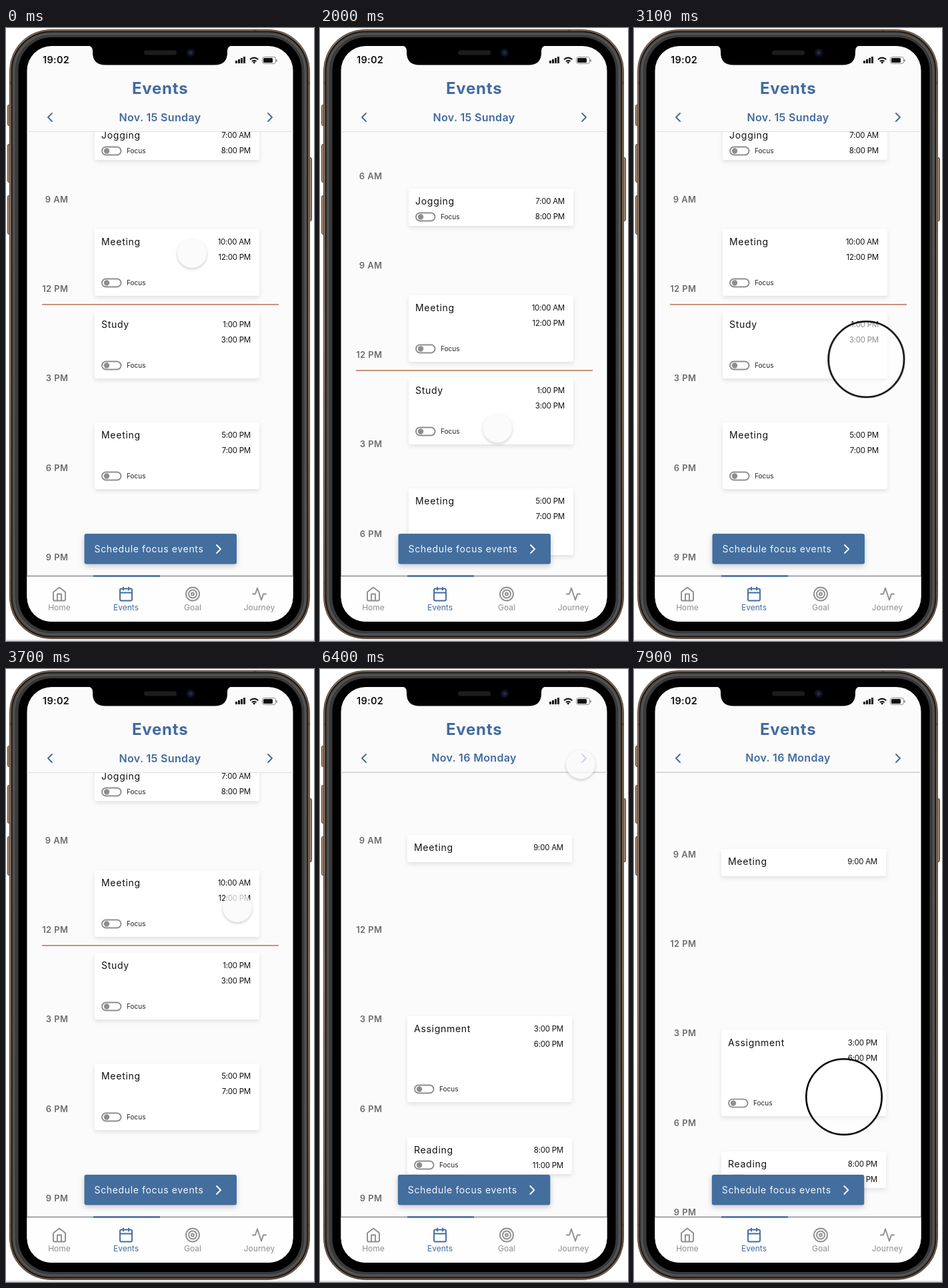
Recreate the animation shown at these times as an HTML page. Size 462 by 920 pixels, loop 8000 ms.

```html
<!DOCTYPE html>
<html lang="en">
<head>
<meta charset="utf-8">
<title>Events calendar</title>
<style>
html, body { margin: 0; width: 100%; height: 100%; overflow: hidden; background: #fff; }
svg { display: block; width: 462px; height: 920px; }
text { font-family: Inter, Roboto, sans-serif; white-space: pre; }
.mid { text-anchor: middle; }
.end { text-anchor: end; }
.line { fill: none; stroke: currentColor; stroke-width: 1.9; stroke-linecap: round; stroke-linejoin: round; }
.blue { color: #426b9f; }
.grey { color: #8e8e8e; }
.tint { fill: currentColor; }
.clock { font-size: 14.5px; font-weight: 600; fill: #111; letter-spacing: .3px; }
.title { font-size: 24px; font-weight: 700; letter-spacing: .8px; }
.date { font-size: 16px; font-weight: 600; letter-spacing: .35px; }
.hour { font-size: 13px; font-weight: 600; letter-spacing: .4px; fill: #6c6c6c; }
.name { font-size: 14px; letter-spacing: .72px; fill: #111; }
.time { font-size: 11.5px; letter-spacing: -.25px; fill: #111; }
.focus { font-size: 10px; fill: #222; }
.tab { font-size: 12px; }
.cta { font-size: 14px; letter-spacing: .65px; fill: #f4f8fc; }
.card { fill: #fff; filter: drop-shadow(0 3px 3px rgba(0,0,0,.1)); }
.button { fill: #436e9e; filter: drop-shadow(0 3px 4px rgba(0,0,0,.2)); }

.scroll, .touch, .dot, .ring, .sun, .mon { animation: 8s linear infinite; }
.scroll { animation-name: scroll; }
.touch { animation-name: touch; }
.dot { animation-name: dot; filter: drop-shadow(0 2px 2px rgba(0,0,0,.25)); }
.ring { animation-name: ring; }
.sun, .mon { animation-timing-function: step-end; }
.sun { animation-name: sun; }
.mon { animation-name: mon; }

@keyframes scroll {
  0%, 6% { transform: translateY(0); }
  10.9%, 31% { transform: translateY(99px); }
  35% { transform: translateY(32px); }
  35.8%, 96.5% { transform: translateY(0); }
  98.75% { transform: translateY(21px); }
  100% { transform: translateY(33px); }
}
@keyframes touch {
  0%, 6% { transform: translate(279px, 338px); }
  19%, 25% { transform: translate(266px, 600px); }
  30%, 31% { transform: translate(350px, 726px); }
  35% { transform: translate(350px, 659px); }
  42%, 47% { transform: translate(347px, 358px); }
  57%, 82% { transform: translate(391px, 143px); }
  94%, 96.5% { transform: translate(315px, 621px); }
  98.75% { transform: translate(315px, 642px); }
  100% { transform: translate(315px, 654px); }
}
@keyframes dot {
  0%, 5%, 20%, 30%, 43%, 67%, 71%, 95.5% { opacity: .76; }
  6%, 19%, 31%, 42%, 68%, 70%, 96.5%, 100% { opacity: 0; }
}
@keyframes ring {
  0%, 5%, 20%, 30%, 43%, 67%, 71%, 95.5% { opacity: 0; transform: scale(.4); }
  6%, 19%, 31%, 42%, 68%, 70%, 96.5%, 100% { opacity: 1; transform: scale(1); }
}
@keyframes sun { 0% { visibility: visible; } 70%, 100% { visibility: hidden; } }
@keyframes mon { 0% { visibility: hidden; } 70%, 100% { visibility: visible; } }
</style>
</head>
<body>
<svg viewBox="0 0 462 920">
  <defs>
    <clipPath id="list"><rect x="31" y="155.5" width="400" height="667"/></clipPath>
    <clipPath id="screen"><rect x="31.5" y="27" width="399" height="864" rx="37"/></clipPath>
    <linearGradient id="gold" x2="0" y2="1">
      <stop stop-color="#8a705c"/><stop offset=".5" stop-color="#a98d78"/><stop offset="1" stop-color="#75604f"/>
    </linearGradient>
  </defs>

  <path d="M0 919H462" stroke="#bdbdbd"/>
  <g fill="#a08875" stroke="#493a30">
    <rect x="2.5" y="115.5" width="6" height="31" rx="2"/>
    <rect x="2.5" y="174.5" width="6" height="57" rx="2"/>
    <rect x="2.5" y="251.5" width="6" height="58" rx="2"/>
    <rect x="452.5" y="194.5" width="6" height="95" rx="2"/>
  </g>
  <rect x="5.5" y="2.5" width="450" height="914" rx="62" fill="url(#gold)" stroke="#4a3c33"/>
  <path d="M374 3v4M90 912v4M6 83h4M6 834h4M451 83h4M451 834h4" stroke="#6f5d50" stroke-width="4"/>
  <rect x="8.5" y="5.5" width="444" height="908" rx="59" fill="#4b4b4b" stroke="#1a1816" stroke-width="2"/>
  <rect x="12.5" y="9.5" width="436" height="900" rx="55" fill="#3a3a3a" stroke="#585858" stroke-width="1.5"/>
  <rect x="18.5" y="14" width="425" height="891" rx="50"/>
  <g clip-path="url(#screen)">
    <path d="M31 26h400v865h-400z" fill="#fbfbfb"/>
    <g clip-path="url(#list)"><g id="days" class="scroll"></g></g>
    <path d="M31 155.5H431" stroke="#dedede"/>
    <path class="mon" d="M31 155H431" stroke="#c6c6c6"/>

    <text class="clock" x="55" y="53">19:02</text>
    <path d="M345.5 53v-4M349.5 53v-6M353.5 53v-8M357.5 53v-10" stroke="#111" stroke-width="3"/>
    <path d="M366 47.2q6.2-5.2 12.4 0M368.8 50.1q3.4-2.8 6.8 0" fill="none" stroke="#111" stroke-width="2"/>
    <path d="M370 51.3q2.2-1.7 4.4 0l-2.2 2.4z" fill="#111"/>
    <rect x="384.5" y="43.5" width="20" height="10" rx="3" fill="none" stroke="#888"/>
    <rect x="386" y="45" width="14" height="7" rx="1.5" fill="#111"/>
    <path d="M406 47v3.5" stroke="#888" stroke-width="1.5"/>

    <g class="blue">
      <text class="title mid tint" x="231.2" y="99">Events</text>
      <text class="date mid tint sun" x="231" y="139.5">Nov. 15 Sunday</text>
      <text class="date mid tint mon" x="231" y="139">Nov. 16 Monday</text>
      <path class="line" d="M69 128l-6 6 6 6M393 128l6 6-6 6"/>
    </g>

    <g id="buttons"></g>

    <path d="M31 823h400v68h-400z" fill="#fefefe"/>
    <path d="M31 822.5H431" stroke="#8b8d92" stroke-width="1.5"/>
    <path d="M131 822.5H231" stroke="#426b9f" stroke-width="2.5"/>
    <g id="tabs"></g>
  </g>

  <path d="M122 26.5q8 0 8 8v2q0 19 19 19h164q19 0 19-19v-2q0-8 8-8z"/>
  <rect x="207" y="33.5" width="49" height="7" rx="3.5" fill="#1d1d1d"/>
  <circle cx="277" cy="37" r="6" fill="#10131f"/>
  <circle cx="277" cy="37" r="2.8" fill="#1d2950"/>

  <g class="touch">
    <circle class="dot" r="22" fill="#fafafa"/>
    <circle class="ring" r="56.7" fill="#fff" fill-opacity=".52" stroke="#000" stroke-width="2.6"/>
  </g>
</svg>
<script>
const put = (id, html) => document.getElementById(id).innerHTML = html;
const text = (cls, x, y, s) => `<text class="${cls}" x="${x}" y="${y}">${s}</text>`;

const toggle = (x, y) => `<g class="grey">
  <rect class="line" x="${x + 1}" y="${y - 6}" width="28.5" height="12" rx="6"/>
  <circle class="tint" cx="${x + 8}" cy="${y}" r="4.2"/></g>` +
  text('focus', x + 38, y + 3.7, 'Focus');

function card(x, y, h, name, from, to) {
  const mid = y + h - (h < 70 ? 13.5 : 19.5);
  return `<rect class="card" x="${x}" y="${y}" width="247" height="${h}" rx="3"/>` +
    text('name', x + 10, y + 24, name) +
    text('time end', x + 234, y + 23, from) +
    (to ? text('time end', x + 234, y + 46, to) + toggle(x + 10, mid) : '');
}

const hours = ['6 AM', '9 AM', '12 PM', '3 PM', '6 PM', '9 PM']
  .map((s, i) => text('hour end', 93.4, 127.5 + 134.25 * i, s)).join('');

const sunday = [
  [142, 56, 'Jogging', '7:00 AM', '8:00 PM'],
  [302, 100, 'Meeting', '10:00 AM', '12:00 PM'],
  [426, 100, 'Study', '1:00 PM', '3:00 PM'],
  [592, 100, 'Meeting', '5:00 PM', '7:00 PM']
];
const monday = [
  [249, 41, 'Meeting', '9:00 AM'],
  [521, 129, 'Assignment', '3:00 PM', '6:00 PM'],
  [703, 55, 'Reading', '8:00 PM', '11:00 PM']
];
const day = (cls, x, list) => `<g class="${cls}">${list.map(e => card(x, ...e)).join('')}</g>`;

put('days', hours + day('sun', 133, sunday) + day('mon', 131, monday) +
  '<path class="sun" d="M54 415H409" stroke="#cb917d" stroke-width="1.8"/>');

const button = (cls, x) => `<g class="${cls}">
  <rect class="button" x="${x}" y="759" width="228.5" height="45.5" rx="3"/>
  ${text('cta', x + 15, 787, 'Schedule focus events')}
  <path class="line" d="M${x + 198.5} 776l6 6-6 6" color="#fff"/></g>`;
put('buttons', button('sun', 117.5) + button('mon', 116.8));

const tabs = [
  ['Home', 'M3 9l9-7 9 7v11a2 2 0 0 1-2 2H5a2 2 0 0 1-2-2zM9 22V12h6v10'],
  ['Events', 'M5 4h14a2 2 0 0 1 2 2v14a2 2 0 0 1-2 2H5a2 2 0 0 1-2-2V6a2 2 0 0 1 2-2zM16 2v4M8 2v4M3 10h18'],
  ['Goal', [10, 6, 2].map(r => `M${12 - r} 12a${r} ${r} 0 1 0 ${2 * r} 0a${r} ${r} 0 1 0 ${-2 * r} 0`).join('')],
  ['Journey', 'M22 12h-4l-3 9L9 3l-3 9H2']
];
put('tabs', tabs.map(([name, d], i) => `<g class="${i === 1 ? 'blue' : 'grey'}">
  <path class="line" transform="translate(${68 + 100 * i} 837.5)" d="${d}"/>
  ${text('tab mid tint', 80 + 100 * i, 873.5, name)}</g>`).join(''));
</script>
</body>
</html>
```
